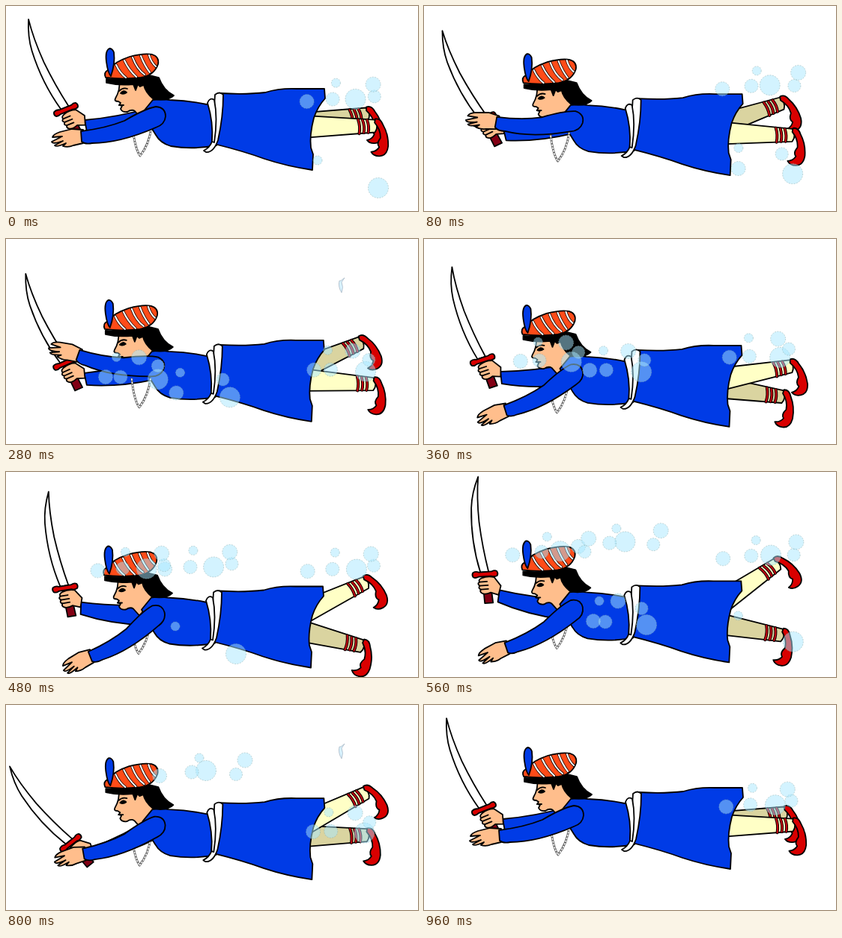
These frames come from a looping animation (550 px wide and 275 px high, 1000 ms). An HTML page:

```html
<!DOCTYPE html>
<html>
<head>
<meta charset="utf-8">
<style>
html, body { margin: 0; overflow: hidden; background: #fff; }
svg { display: block; width: 100vw; height: 100vh; }
#figure { stroke: #000; stroke-width: 1.8; stroke-linejoin: round; stroke-linecap: round; }
.blue { fill: #003be6; }
.skin { fill: #ffbe8c; }
.red { fill: #d80000; }
.white { fill: #fff; }
.line { fill: none; }
.bubble { fill: #a8e8ff; fill-opacity: .5; stroke: #8aa; stroke-opacity: .6; stroke-width: .8; stroke-dasharray: 2 1.5; }
.pop { fill: #d8f2ff; stroke: #aab8c4; stroke-width: .8; }
</style>
</head>
<body>
<svg viewBox="0 0 550 275">
  <defs>
    <path id="bands" d="M468 156Q471 165 469 175M474 157Q477 166 475 174M480 157Q483 166 481 174"/>
    <path id="folds" d="M147 79Q152 90 160 96M158 73Q164 86 174 95M169 69Q175 85 185 92M180 67Q185 80 192 89M191 66Q194 76 200 81"/>
    <path id="chain" d="M169 163Q172 191 179 201Q191 186 194 163"/>
    <g id="leg">
      <path d="M395 148L490 157Q496 166 490 174L395 178Z"/>
      <use href="#bands" class="line" stroke-width="4"/>
      <use href="#bands" class="line" stroke="#c00010" stroke-width="2.2"/>
      <path class="red" d="M491 156Q498 155 501 164Q508 177 507 193Q505 206 495 206Q487 206 484 200Q491 200 495 194Q491 189 497 182Q498 171 490 161Z"/>
    </g>
  </defs>
  <g id="figure">
    <g id="farArm">
      <path class="blue" d="M105 153Q150 149 195 136L197 164Q150 173 108 169Z"/>
      <g transform="translate(80 139) rotate(-22.4)">
        <path class="white" d="M0-131Q-10-110-12-90Q-16-45-6-3H5Q-1-36-3-70Q-4-105 0-131Z"/>
        <path fill="#820014" d="M-4 3H6L8 39H-3Z"/>
        <path class="red" d="M-16-3Q-12-5-8-3H9Q13-5 16-3Q18 0 16 3Q12 5 8 3H-9Q-13 5-16 3Q-18 0-16-3Z"/>
        <path class="skin" d="M-5 5Q4 2 12 5L20 17L16 29L6 25Q-2 28-6 25Q-9 23-7 20Q-11 18-8 15Q-12 12-8 10Q-10 7-5 5Z"/>
        <path class="line" d="M-8 10H2M-8 15H3M-7 20H3"/>
      </g>
    </g>
    <g id="farLeg"><use href="#leg" x="-8" fill="#dad4a0"/></g>
    <g id="nearLeg"><use href="#leg" x="2" fill="#ffffc6"/></g>

    <path class="skin" d="M151 100Q153 112 146 124Q144 128 150 128L153 130L151 133L155 134L153 138Q155 143 162 142Q168 138 172 141L180 150L200 128L190 98Z"/>
    <path class="line" d="M151 114Q156 109 162 111M151 133H157"/>
    <path d="M153 117Q157 112 161 116Q157 119 153 117Z"/>
    <path class="blue" d="M196 126Q206 124 218 126Q245 127 268 132H280L281 187Q250 193 220 188Q206 184 200 173L192 160L183 142Z"/>
    <path class="blue" d="M286 117Q320 119 346 116Q365 110 388 111H425L426 124Q416 135 411 150Q405 173 407 190L410 199L409 220Q375 215 345 205Q318 195 278 185Z"/>
    <path class="white" d="M279 119Q285 114 290 119Q290 148 283 180Q277 197 267 196L264 194Q272 190 275 182Z"/>
    <path class="white" d="M269 130Q272 122 278 126Q283 150 278 183L275 182Q277 156 269 130Z"/>
    <path d="M134 98Q162 101 192 93L204 96Q210 113 224 120Q216 128 197 125Q186 116 184 106L179 108L176 105L173 113L170 105Q150 107 134 103Z"/>
    <path fill="#ff4b18" d="M133 96Q130 89 136 86Q144 75 165 68Q184 63 195 65Q205 68 203 78Q198 93 180 96Q155 99 133 96Z"/>
    <use href="#folds" class="line" stroke-width="3.6"/>
    <use href="#folds" class="line" stroke="#fff" stroke-width="2.1"/>
    <path class="blue" d="M138 57Q132 60 134 75Q136 90 140 94Q146 77 144 62Q142 57 138 57Z"/>
    <use href="#chain" class="line" stroke="#555" stroke-width="2.8"/>
    <use href="#chain" class="line" stroke="#fff" stroke-width="1.5" stroke-dasharray="1.5 2.5"/>

    <g id="nearArm">
      <path class="skin" d="M103 166L88 165L72 169Q63 172 62 176L75 175L61 182Q62 186 76 181L65 187Q67 190 80 184L76 188Q83 190 90 187L103 184Z"/>
      <path class="blue" d="M100 168Q133 164 158 154Q185 138 200 135Q213 136 213 148Q212 159 200 163Q152 184 115 184Q106 186 101 182Z"/>
    </g>
  </g>
  <g id="bubbles"></g>
</svg>
<script>
const el = id => document.getElementById(id);
const rotate = (id, angle, x, y) => el(id).setAttribute('transform', `rotate(${angle} ${x} ${y})`);

// Rounded pulse: 1 at the centre, 0 beyond the half width
const pulse = (t, centre, half) => Math.cos(Math.min(1, Math.abs(t - centre) / half) * Math.PI / 2);

// The sword drifts back, is raised slowly, then swings down
const swing = [[0, 0], [200, -7], [640, 24], [800, -16], [960, 0]];
function swordAngle(t) {
  const i = Math.max(1, swing.findIndex(([time]) => t <= time));
  const [t0, a0] = swing[i - 1], [t1, a1] = swing[i];
  return a0 + (a1 - a0) * (t - t0) / (t1 - t0);
}

function pose(t) {
  const sink = 1 - Math.abs(t - 480) / 480;
  const stroke = pulse(t, 200, 155);
  el('figure').setAttribute('transform', `translate(${-2 * sink} ${42.5 * sink})`);
  rotate('farArm', swordAngle(t), 197, 130);
  rotate('nearArm', 49 * stroke - 17.5 * sink, 205, 145);
  rotate('farLeg', 22.6 * sink - 41 * stroke - 10, 364, 156);
  rotate('nearLeg', 14 * sink - 47 * pulse(t, 610, 350) - 2, 364, 156);
}

// Radius, place at birth and travel per stage; each pair appears a little later
const cluster = [
  { r: 6, x: 416, y: 207, dx: 8, dy: -34 },
  { r: 13.5, x: 497, y: 244, dx: -10, dy: -39 },
  { r: 8.5, x: 475, y: 213, dx: 5.5, dy: -30 },
  { r: 9.5, x: 423, y: 235, dx: -7, dy: -35 },
  { r: 10, x: 429, y: 206, dx: 20, dy: -33 },
  { r: 9, x: 430, y: 238, dx: 2, dy: -37 }
];
const rises = [
  { shift: 0, birth: 0, stage: 165 },
  { shift: 0, birth: 490, stage: 167 },
  { shift: -190, birth: 205, stage: 92 },
  { shift: -190, birth: 480, stage: 80 },
  { shift: -280, birth: 90, stage: 133 }
];

function drawRise(t, { shift, birth, stage }) {
  const p = (t - birth) / stage;
  if (p < 0 || p > 4.9) return '';
  if (p > 4.3) {
    return `<path class="pop" transform="translate(${shift + 447} 63)" d="M-2-7Q-4 1 1 9Q4 1 1-5L5-11L0-7Z"/>`;
  }
  return cluster
    .filter((b, i) => p >= Math.floor(i / 2) * 0.43)
    .map(b => `<circle class="bubble" cx="${shift + b.x + b.dx * p}" cy="${b.y + b.dy * p}" r="${b.r}"/>`)
    .join('');
}

function frame(now) {
  const t = Math.floor(now % 1000 / 40) * 40;
  pose(t);
  el('bubbles').innerHTML = rises.map(r => drawRise(t, r) + drawRise(t + 1000, r)).join('');
  requestAnimationFrame(frame);
}
requestAnimationFrame(frame);
</script>
</body>
</html>
```
